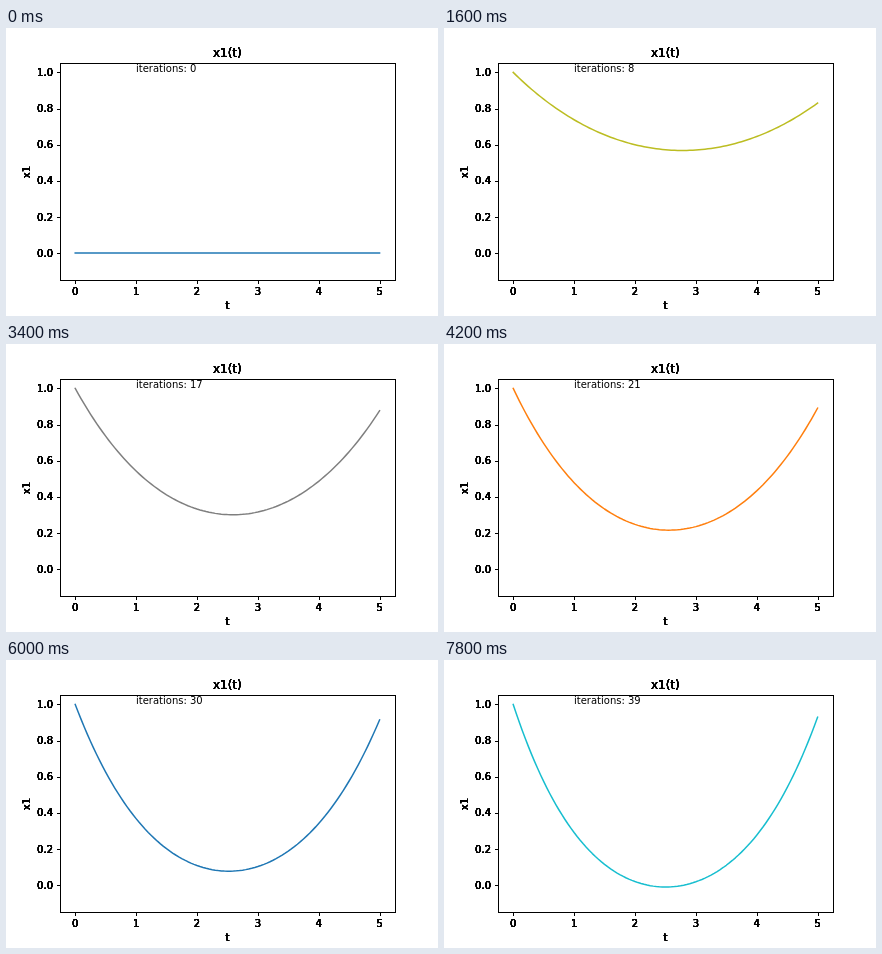
Recreate the animation shown at these times as an HTML page. Size 432 by 288 pixels, loop 8000 ms.

```html
<!DOCTYPE html>
<html lang="en">
<head>
<meta charset="utf-8">
<title>x1(t)</title>
<style>
  html, body { margin: 0; width: 100%; height: 100%; overflow: hidden; background: #fff; }
  svg { display: block; width: 432px; height: 288px; }
  text { font: 10px "DejaVu Sans", sans-serif; fill: #000; }
  .title { font-size: 12px; }
  .axes { fill: none; stroke: #000; }
</style>
</head>
<body>
<svg viewBox="0 0 432 288">
  <path id="curve" fill="none" stroke-width="1.5" stroke-linecap="square" stroke-linejoin="round"/>
  <g id="ticks" class="axes"><rect x="54.5" y="35.5" width="335" height="217"/></g>
  <g id="labels"></g>
  <text id="count" x="130" y="44"></text>
</svg>
<script>
const LOOP = 8000, STEP = 200, T_END = 5, SAMPLES = 100;
const COLORS = ['#1f77b4', '#ff7f0e', '#2ca02c', '#d62728', '#9467bd',
                '#8c564b', '#e377c2', '#7f7f7f', '#bcbd22', '#17becf'];
const get = id => document.getElementById(id);
const px = t => 69.22 + 60.87 * t;
const py = v => 225.1 - 180.7 * v;
const snap = p => Math.floor(p + 0.5) + 0.5;

function add(parent, tag, attrs, text = '') {
  const el = document.createElementNS('http://www.w3.org/2000/svg', tag);
  for (const key in attrs) el.setAttribute(key, attrs[key]);
  el.textContent = text;
  parent.appendChild(el);
}

// Labels are stacked several times, which hardens their antialiased edges.
function label(text, x, y, anchor, extra = {}) {
  for (let i = 0; i < 8; i++) {
    add(get('labels'), 'text', { x, y, 'text-anchor': anchor, ...extra }, text);
  }
}

function drawAxes() {
  const ticks = get('ticks');
  for (let i = 0; i <= 5; i++) {
    const x = snap(px(i)), y = snap(py(i / 5));
    add(ticks, 'path', { d: `M${x} 252.5v3.5M54.5 ${y}h-3.5` });
    label(String(i), px(i), 267, 'middle');
    label((i / 5).toFixed(1), 47, Math.round(py(i / 5) + 3.6), 'end');
  }
  label('x1(t)', 221.4, 29, 'middle', { class: 'title' });
  label('t', 221.4, 281, 'middle');
  label('x1', 0, 0, 'middle', { transform: 'translate(24 144) rotate(-90)' });
}

// Each iteration moves 5% closer to the sagging limit curve.
function state(n, s) {
  if (n === 0) return 0;
  const q = 0.95 ** (n - 1);
  const chord = 1 - (0.0455 + 0.178 * q) * s;
  const w = 4 * s * (1 - s);
  const sag = 1.137 * (1 - q) * (w + 0.0065 * n * w * (1 - w));
  return chord - sag * (1 + 0.034 * (1 - 2 * s));
}

function curvePath(n) {
  if (n === 0) return `M${px(0)} 225H${px(T_END)}`;
  const points = [];
  for (let i = 0; i <= SAMPLES; i++) {
    const s = i / SAMPLES;
    points.push(px(s * T_END).toFixed(2) + ' ' + py(state(n, s)).toFixed(2));
  }
  return 'M' + points.join('L');
}

let shown = -1;
function render(ms) {
  const n = Math.floor((ms % LOOP) / STEP);
  if (n !== shown) {
    shown = n;
    get('curve').setAttribute('d', curvePath(n));
    get('curve').setAttribute('stroke', COLORS[n % COLORS.length]);
    get('count').textContent = 'iterations: ' + n;
  }
}

drawAxes();
render(0);
const start = performance.now();
(function tick() {
  render(performance.now() - start);
  requestAnimationFrame(tick);
})();
</script>
</body>
</html>
```
